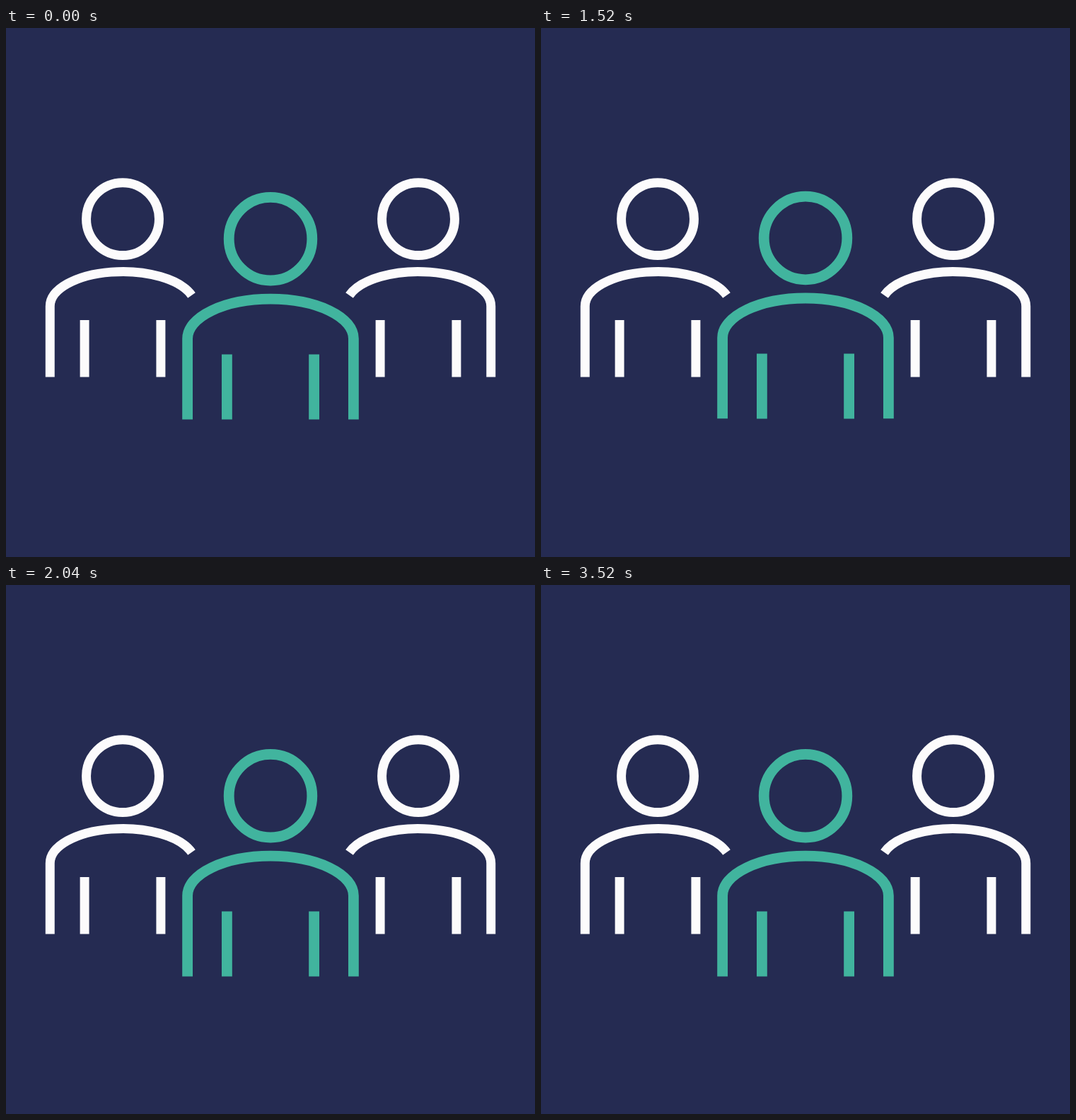
These frames come from a looping animation (748 by 748 pixels, 4000 ms). An HTML page:

```html
<!DOCTYPE html>
<html lang="en">
<head>
<meta charset="utf-8">
<title>Team</title>
<style>
  html, body { margin: 0; height: 100%; overflow: hidden; background: #252b52; }
  svg { display: block; width: 100%; height: 100%; fill: none; stroke-width: 14.8; }
</style>
</head>
<body>
<svg viewBox="0 0 748 748">
  <defs>
    <!-- Head and legs, centred on the head -->
    <g id="figure">
      <circle r="58.8"/>
      <path d="M-61.6 163.4V255.4M61.6 163.4V255.4"/>
    </g>
    <g id="side">
      <use href="#figure"/>
      <path d="M-117.4 255.2V141A117.4 56 0 0 1 111.4 123.3"/>
    </g>
  </defs>
  <g stroke="#fcfbfc">
    <use href="#side" transform="translate(165 270.1) scale(.875)"/>
    <use href="#side" transform="translate(583 270.1) scale(-.875 .875)"/>
  </g>
  <g id="leader" stroke="#41b49e">
    <use href="#figure"/>
    <path d="M-117.4 255.2V141A117.4 56 0 0 1 117.4 141V255.2"/>
  </g>
</svg>
<script>
  const LOOP = 4000, STEP = 40, PERIOD = 1500, RISE = 260, HEIGHT = 18.5;
  const leader = document.getElementById('leader');

  // Mostly linear, slightly softened at both ends
  const ease = p => 0.79 * p + 0.21 * p * p * (3 - 2 * p);

  function hop(time) {
    const phase = time % PERIOD;
    return HEIGHT * ease(Math.max(0, 1 - Math.abs(phase - RISE) / RISE));
  }

  const start = performance.now();
  function draw() {
    const elapsed = Math.max(0, performance.now() - start) % LOOP;
    const time = Math.floor(elapsed / STEP) * STEP;
    leader.setAttribute('transform', `translate(374 ${298.2 - hop(time)})`);
    requestAnimationFrame(draw);
  }
  draw();
</script>
</body>
</html>
```
